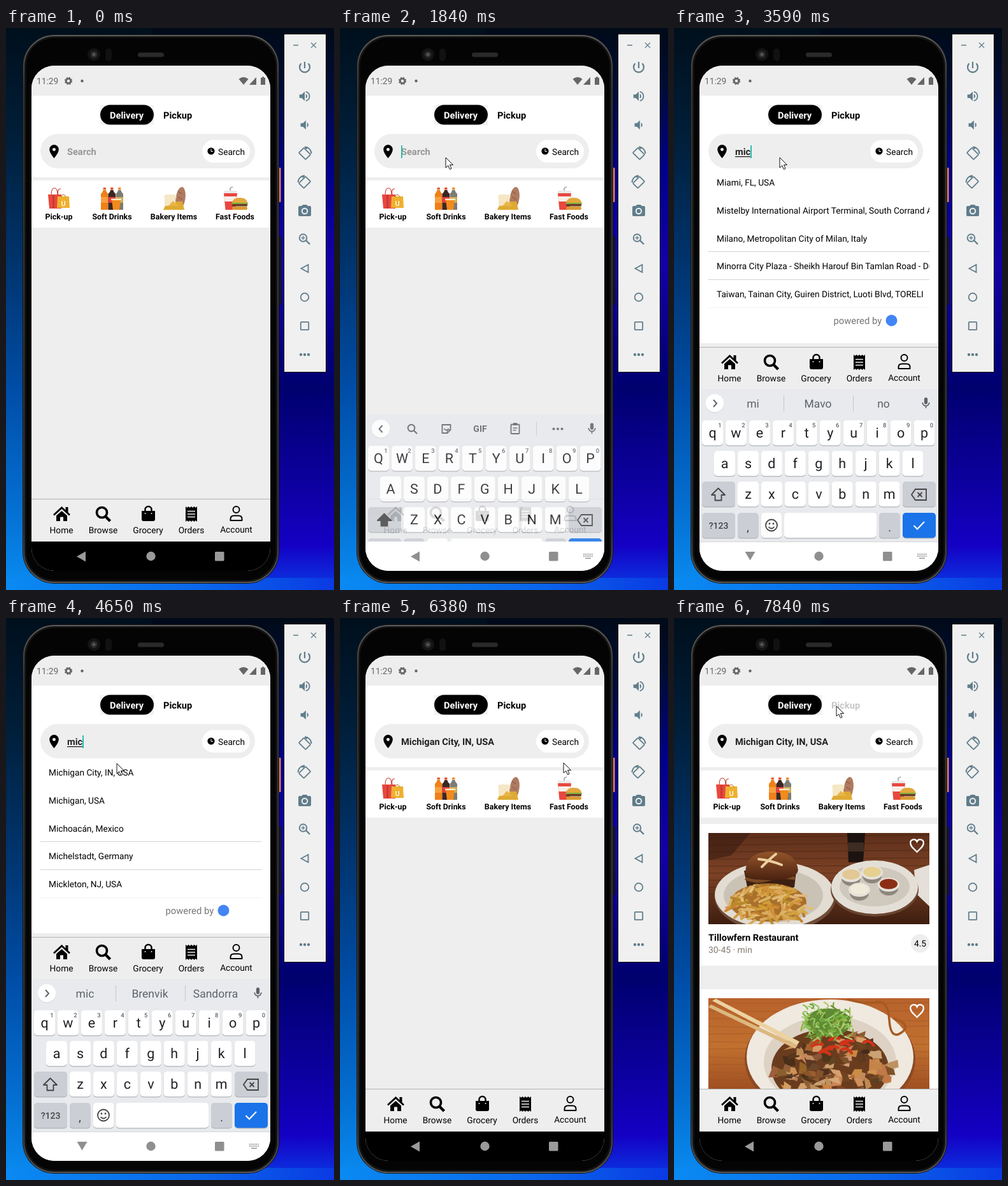
An HTML page for the animation above (8 s loop, 515x881 px).

```html
<!DOCTYPE html>
<html lang="en">
<head>
<meta charset="utf-8">
<title>Food delivery app</title>
<style>
html, body { margin: 0; width: 100%; height: 100%; overflow: hidden; background: #001020; }
svg { display: block; width: 100%; height: 100%; }
text { font-family: Roboto, "Open Sans", sans-serif; text-rendering: geometricPrecision; white-space: pre; }
</style>
</head>
<body>
<svg id="stage" viewBox="0 0 515 881" preserveAspectRatio="none"></svg>
<script>
const LOOP = 8000;

// ---- drawing helpers ----
const rect = (x, y, w, h, fill, r = 0, more = '') =>
  `<rect x="${x}" y="${y}" width="${w}" height="${h}" rx="${r}" fill="${fill}" ${more}/>`;
const disc = (x, y, r, fill, more = '') => `<circle cx="${x}" cy="${y}" r="${r}" fill="${fill}" ${more}/>`;
const oval = (x, y, rx, ry, fill, more = '') =>
  `<ellipse cx="${x}" cy="${y}" rx="${rx}" ry="${ry}" fill="${fill}" ${more}/>`;
const path = (d, fill, more = '') => `<path d="${d}" fill="${fill}" ${more}/>`;
const line = (d, color, w = 2, more = '') =>
  `<path d="${d}" fill="none" stroke="${color}" stroke-width="${w}" ${more}/>`;
const ring = (x, y, r, color, w = 2, more = '') =>
  `<circle cx="${x}" cy="${y}" r="${r}" fill="none" stroke="${color}" stroke-width="${w}" ${more}/>`;
const text = (x, y, size, str, { w = 400, f = '#000', a = 'start', id = '' } = {}) =>
  `<text ${id && `id="${id}"`} x="${x}" y="${y}" font-size="${size}" font-weight="${w}" fill="${f}" text-anchor="${a}">${str}</text>`;
const group = (id, body, more = '') => `<g ${id && `id="${id}"`} ${more}>${body}</g>`;
const at = (x, y, scale, body) => group('', body, `transform="translate(${x} ${y}) scale(${scale}) translate(-12 -12)"`);
const grad = (id, dir, stops) => `<linearGradient id="${id}" ${dir}>` +
  stops.map(([o, c]) => `<stop offset="${o}" stop-color="${c}"/>`).join('') + '</linearGradient>';
const DOWN = 'x1="0" y1="0" x2="0" y2="1"';
const ROUND = 'stroke-linecap="round"';
let seed = 7;
const rnd = (lo, hi) => lo + (hi - lo) * ((seed = (seed * 16807) % 2147483647) / 2147483647);
const many = (n, fn) => Array.from({ length: n }, (_, i) => fn(i)).join('');

const defs = '<defs>' +
  grad('left', DOWN, [[0, '#000f1c'], [.2, '#001f3a'], [.45, '#003775'], [.65, '#004ea8'], [.85, '#046ed0'], [1, '#0a8cf2']]) +
  grad('right', DOWN, [[0, '#000a18'], [.1, '#000c34'], [.25, '#00008c'], [.42, '#1400a8'], [.64, '#00006e'], [.8, '#0c009c'], [.92, '#1400c4'], [1, '#0a3ae4']]) +
  grad('floor', '', [[0, '#0a8af2'], [.6, '#0a66ea'], [1, '#0a3ae4']]) +
  grad('rim', DOWN, [[0, '#5c5c5c'], [.1, '#353535'], [.9, '#333'], [1, '#565656']]) +
  grad('wood', DOWN, [[0, '#5e2f1a'], [.45, '#7c4226'], [1, '#3d1d10']]) +
  grad('oak', DOWN, [[0, '#b8622c'], [.5, '#c0702f'], [1, '#9c4c20']]) +
  grad('bun', DOWN, [[0, '#94552a'], [1, '#4a2110']]) +
  `<clipPath id="screen">${rect(40, 59, 375, 792, '#000', 36)}</clipPath>` +
  `<clipPath id="rows">${rect(54, 220, 347, 270, '#000')}</clipPath>` +
  `<clipPath id="pic1">${rect(54, 337, 347, 143, '#000')}</clipPath>` +
  `<clipPath id="pic2">${rect(54, 596, 347, 150, '#000')}</clipPath>` +
  '</defs>';

// ---- desktop, phone body and emulator bar ----
const desktop = () => rect(0, 0, 230, 881, 'url(#left)') + rect(230, 0, 285, 881, 'url(#right)') +
  rect(0, 862, 515, 19, 'url(#floor)');

const phone = () =>
  rect(427, 219, 4.5, 54, '#f0805c', 1) + rect(427, 327, 5, 107, '#16161c', 1) +
  rect(26, 10, 403, 861, '#141414', 50) +
  rect(28, 12, 399, 857, 'none', 48, 'stroke="url(#rim)" stroke-width="2"') +
  rect(31.5, 15.5, 392, 850, '#040404', 45) +
  disc(138, 41.5, 10, '#131313') + disc(138, 41.5, 5.5, '#2a2a2a') + disc(138, 41.5, 2.5, '#555') +
  rect(156, 32, 10, 20, '#111', 5) + rect(207, 38.5, 41, 7, '#2a2a2a', 3.5);

function sideBar() {
  const c = '#607d8b', x = 469;
  const cone = 'M3 9v6h4l5 5V4L7 9Z';
  const turn = m => group('', rect(-5.5, -7.5, 11, 15, 'none', 1, `transform="rotate(-45)" stroke="${c}" stroke-width="1.8"`) +
    line('M0-10.500A10.500 10.500 0 0 1 10.500 0M0-10.500l3.500 3', c, 1.8),
    `transform="translate(${x} ${m < 0 ? 242 : 197}) scale(${m} 1)"`);
  return rect(436.5, 9.5, 66, 530, '#f0f0f0', 0, 'stroke="#000"') +
    line('M451 27h8M479 23l8 8m0-8l-8 8', '#607d8b', 1.3) +
    line('M469 53v10M463.5 55.5A8 8 0 1 0 474.5 55.5', c, 2.2) +
    at(x, 107, .92, path(cone, c) + path('M14 8a4.5 4.5 0 0 1 0 8Z', c) + line('M14 4.2a8 8 0 0 1 0 15.6', c, 2)) +
    at(x, 152, .92, path(cone, c, 'transform="translate(2)"') + path('M16 8a4.5 4.5 0 0 1 0 8Z', c)) +
    turn(1) + turn(-1) +
    at(x, 287, 1, path('M9 2L7.2 4H4a2 2 0 0 0-2 2V18a2 2 0 0 0 2 2H20a2 2 0 0 0 2-2V6a2 2 0 0 0-2-2H16.8L15 2Z', c) +
      ring(12, 12, 4.2, '#f0f0f0', 2)) +
    ring(466.5, 329, 5.8, c, 1.9) + line('M471 333l6 6', c, 2.4) + line('M463.5 329h6m-3-3v6', c, 1.3) +
    line('M474.5 371V383L463.5 377Z', c, 1.8) + ring(x, 422, 6.3, c, 1.8) +
    rect(462.8, 460.8, 12.4, 12.4, 'none', 1, `stroke="${c}" stroke-width="1.8"`) +
    [-6, 0, 6].map(d => disc(x + d, 512, 2.2, c)).join('');
}

// ---- app ----
const statusBar = () => {
  const c = '#666';
  return rect(40, 59, 375, 47, '#eee') + text(48, 88, 13.8, '11:29', { f: c }) +
    ring(98, 83, 3.6, c, 2.6) + ring(98, 83, 5.2, c, 1.8, 'stroke-dasharray="2.4 1.7"') + disc(119.5, 83, 2.2, c) +
    path('M365.5 80Q373 74 380.5 80L373 89Z', c) + path('M382 89H393V77Z', c) +
    path('M402 76.500h3V78h2V89h-7V78h2Z', c);
};

const bags = () => line('M71 262q0-11 5-11t5 11M82 262q-2-10 4-10', '#c64a40', 1.2) +
  path('M66 261H87V283H68Z', '#e9473e') + rect(73, 262, 3, 21, '#c93a33') +
  path('M81 264H99L100 282H80Z', '#efb02e') + line('M86 265q4-8 8 0', '#a9741a', 1) +
  text(90, 279, 11, 'U', { w: 500, f: '#fff', a: 'middle' });

const bottle = (x, body, label, cap) => rect(x + 3.5, 250, 4.5, 3.5, cap, 1) +
  path(`M${x + 3.5} 254h4.500q0 3 3.500 6V285h-11.500V260q3.500-3 3.500-6Z`, body) + rect(x, 265, 11.5, 9, label);
const drinks = () => bottle(149, '#f08018', '#f8a040', '#e8602c') + bottle(160.5, '#3b2724', '#e6403a', '#e8502c') +
  bottle(172.5, '#7c7c74', '#c9b25a', '#f08a2c') +
  path('M166 269h14l-2 16h-10Z', '#f28a1c') + rect(165, 267.5, 16, 2.5, '#ffe9c8');

const bread = () => oval(274, 267, 7.5, 18, '#b07a60', 'transform="rotate(8 274 267)"') +
  line('M270 256l6 4m-6 5l7 4m-7 5l6 4', '#8f5c46', 1.3) +
  path('M247 285L253 272H277L280 285Z', '#deaa32') +
  path('M249 279V267Q246 261 254 261H264Q270 264 266 268V278Z', '#f6e7c4') +
  path('M255 279L262 271 271 279Z', '#e8b648');

const burger = () => line('M352 258V251L356 249', '#888', 1.2) + rect(342, 255, 21, 4, '#e9e9e9', 2) +
  path('M342 259H363L360.500 285H344.500Z', '#e8483f') + path('M342.500 264H362.500L361.500 272H343.500Z', '#f7f0ea') +
  path('M355 274Q356 266 367 266T379 274Z', '#e2a83c') + rect(354, 274, 26, 2.5, '#7fae3c', 1) +
  rect(355, 276, 24, 3.5, '#6b3a26', 1) + rect(355, 280, 24, 5, '#d99a30', 2.5);

function header() {
  return rect(40, 106, 375, 128, '#fff') + rect(148, 121, 84, 31, '#f2f2f2') + rect(148, 120.5, 84, 31, '#000', 15.5) +
    text(163, 141.6, 14.6, 'Delivery', { w: 700, f: '#fff' }) +
    text(247, 141.6, 14.6, 'Pickup', { w: 700, id: 'pickup' }) +
    rect(54, 166, 337, 54, '#eee', 27) + rect(308, 175.5, 75, 35.5, '#fff', 17.7) +
    at(75.500, 193.500, 1.04, path('M12 2A7 7 0 0 0 5 9c0 5.250 7 13 7 13s7-7.750 7-13A7 7 0 0 0 12 2Z', '#000') + disc(12, 9, 2.4, '#eee')) +
    disc(322, 193, 5.6, '#000') + line('M322 189.500V193.500H325', '#fff', 1) +
    text(333, 198.6, 13.7, 'Search') +
    text(96, 199.2, 14.6, 'Search', { w: 700, f: '#979797', id: 'hint' }) +
    text(96, 199.2, 14.6, '', { w: 700, f: '#222', id: 'value' }) +
    rect(96, 201, 0, 1.3, '#222', 0, 'id="under"') + rect(96, 184, 1.8, 20, '#17b8a6', 0, 'id="caret"');
}

const categories = () => rect(40, 239, 375, 74, '#fff') + bags() + drinks() + bread() + burger() +
  [[83, 'Pick-up'], [166.5, 'Soft Drinks'], [263.5, 'Bakery Items'], [359.5, 'Fast Foods']]
    .map(([x, s]) => text(x, 300, 12.4, s, { w: 700, a: 'middle' })).join('');

// ---- flat food pictures ----
const fries = () => oval(148, 446, 60, 30, '#a8702c') + many(120, () => {
  const r = Math.sqrt(rnd(0, 1)), b = rnd(0, 6.28), x = 148 + 60 * r * Math.cos(b), y = 446 + 30 * r * Math.sin(b);
  const a = rnd(0, Math.PI), n = rnd(8, 20);
  return line(`M${x} ${y}l${Math.cos(a) * n} ${Math.sin(a) * n * .7}`, `hsl(${rnd(33, 42)} 62% ${rnd(44, 70)}%)`, 4, ROUND);
});

const dip = (x, y, c) => oval(x, y + 5, 15, 12, '#8e877e') + oval(x, y, 17, 11, '#e6e2da') + oval(x, y - 1, 14, 8, c);

const photo1 = () => group('', rect(54, 337, 347, 143, 'url(#wood)') +
  many(9, i => line(`M54 ${345 + i * 11}L401 ${340 + i * 12}`, '#3a1a0e', 1, 'opacity=".5"')) +
  path('M54 337H120L90 372 54 380Z', '#3a1c12', 'opacity=".6"') +
  path('M272 337H300L297 383H274Z', '#1c1210') + rect(273, 352, 25, 14, '#3d2c22') +
  path('M377 395L401 387V452L380 432Z', '#e4dfd8') +
  oval(159, 438, 95, 54, '#6e4c38') + oval(158, 434, 94, 52, '#e2dcd2') + oval(156, 435, 78, 42, '#cbc2b6') +
  path('M110 396h82l-3 26q-36 12-74 0Z', '#3c2012') + line('M112 408q18 8 36 2t42-2', '#7a4a22', 5) + fries() +
  path('M112 400Q112 367 152 366T195 396Q190 411 152 411T112 400Z', 'url(#bun)') +
  line('M133 378Q152 380 169 387M160 370Q150 378 138 390', '#ecd0a0', 4, ROUND) +
  oval(315, 426, 69, 42, '#6a4632') + oval(315, 422, 68, 42, '#e4dfd6') + oval(315, 421, 55, 31, '#cfc8bd') +
  dip(278, 403, '#e2c894') + dip(311, 399, '#e6d090') + dip(291, 426, '#f0ead8') + dip(337, 418, '#8c2e14'),
  'clip-path="url(#pic1)"');

const photo2 = () => group('', rect(54, 596, 347, 150, 'url(#oak)') +
  many(12, i => line(`M54 ${604 + i * 12}q170 ${rnd(-9, 9)} 347 ${rnd(-5, 5)}`, '#9a4e20', 1.2, 'opacity=".45"')) +
  oval(245, 692, 134, 92, '#8c4a24') + oval(245, 688, 131, 90, '#efe9e0') + oval(245, 696, 104, 72, '#ddd2c4') +
  line('M274 598Q300 606 318 602T338 630 357 650 346 628', '#a85a20', 3.5, ROUND) +
  oval(245, 706, 92, 62, '#6a3c1e') +
  many(130, () => {
    const a = rnd(0, 6.28), r = Math.sqrt(rnd(0, 1)), x = 245 + 90 * r * Math.cos(a), y = 706 + 58 * r * Math.sin(a);
    return path(`M${x} ${y}l${rnd(8, 20)} ${rnd(-8, 8)}l${rnd(-5, 5)} ${rnd(6, 13)}l${rnd(-20, -8)} ${rnd(-5, 5)}Z`,
      `hsl(${rnd(22, 33)} ${rnd(42, 58)}% ${rnd(18, 66)}%)`);
  }) +
  many(11, () => line(`M${rnd(215, 300)} ${rnd(652, 686)}q8-5 ${rnd(10, 20)} ${rnd(-6, 8)}`, '#cf3418', 4.5, ROUND)) +
  oval(242, 634, 36, 22, '#5f8a34') +
  many(110, () => {
    const x = rnd(205, 278), y = rnd(612, 658);
    return line(`M${x} ${y}q${rnd(-10, 10)} -4 ${rnd(-13, 13)} ${rnd(-12, 12)}`, `hsl(${rnd(76, 95)} 46% ${rnd(30, 66)}%)`, 2.2, ROUND);
  }) +
  path('M60 600L66 597 197 664 193 670Z', '#ecd2a0') + path('M54 610L58 606 194 670 190 675Z', '#dcb880'),
  'clip-path="url(#pic2)"');

const heart = y => at(381.5, y, 1.14, line('M12 20.500L10.500 19C5.500 14.500 3 12 3 8.500A4.700 4.700 0 0 1 12 6.300 4.700 4.700 0 0 1 21 8.500C21 12 18.500 14.500 13.500 19Z', '#fff', 2));

const cards = () => rect(40, 323, 375, 222, '#fff') + rect(40, 582, 375, 160, '#fff') +
  photo1() + photo2() + heart(357) + heart(616) +
  text(54, 505.5, 14.6, 'Tillowfern Restaurant', { w: 700 }) +
  text(54, 525, 13.9, '30-45 · min', { f: '#85796f' }) +
  disc(386.5, 510, 14.5, '#eee') + text(386.5, 515, 13.7, '4.5', { a: 'middle' });

// ---- place list ----
const PLACES = {
  mi: ['Miami, FL, USA', 'Mistelby International Airport Terminal, South Corrand Ave', 'Milano, Metropolitan City of Milan, Italy',
    'Minorra City Plaza - Sheikh Harouf Bin Tamlan Road - Dubai', 'Taiwan, Tainan City, Guiren District, Luoti Blvd, TORELI'],
  mic: ['Michigan City, IN, USA', 'Michigan, USA', 'Michoacán, Mexico', 'Michelstadt, Germany', 'Mickleton, NJ, USA']
};
const rows = key => group('rows-' + key, PLACES[key].map((s, i) =>
  text(67, 246.800 + i * 43.85, 13.7, s, { id: key + i })).join(''), 'clip-path="url(#rows)"');
const list = () => rect(40, 220, 375, 274, '#fff') + rect(40, 494, 375, 6, '#eee') +
  rect(54, 350, 347, 1, '#d2d2d2') + rect(54, 394, 347, 1, '#d2d2d2') + rect(54, 438, 347, 1, '#f3f3f3') +
  rows('mi') + rows('mic') +
  group('credit', text(250.5, 463.5, 14.8, 'powered by', { f: '#757575' }) + disc(341.5, 458.5, 9, '#4285f4'));

// ---- tab bar ----
const tabs = () => rect(40, 738, 375, 67, '#eee') + rect(40, 738, 375, 1, '#b4b4b4') +
  line('M75 763.500L87.500 752 100 763.500', '#000', 2.8) + rect(93.500, 751, 4, 8, '#000') +
  path('M79 764.500L87.500 757 96 764.500V773H90V766.500H85V773H79Z', '#000') +
  ring(150.5, 759.5, 8, '#000', 3.6) + line('M156 765.500l7.500 7.500', '#000', 4.4) +
  path('M213 757H234V770q0 3-3 3H216q-3 0-3-3Z', '#000') + line('M218.500 758V755a5 5 0 0 1 10 0V758', '#000', 2.4) +
  disc(218.5, 761, 1, '#eee') + disc(228.5, 761, 1, '#eee') +
  path('M282 750l2.250 2 2.250-2 2.250 2 2.250-2 2.250 2 2.250-2 2.250 2 2.250-2V774l-2.250-2-2.250 2-2.250-2-2.250 2-2.250-2-2.250 2-2.250-2-2.250 2Z', '#000') +
  line('M285 757.500h12m-12 4.500h12m-12 4.500h12', '#eee', 1.6) +
  ring(361.5, 755, 5, '#000', 2) + path('M352.500 772V769.500Q352.500 764.500 358 764.500H365Q370.500 764.500 370.500 769.500V772Z', 'none', 'stroke="#000" stroke-width="2" stroke-linejoin="round"') +
  [[87, 'Home', 792], [152.5, 'Browse', 792], [223, 'Grocery', 792], [291, 'Orders', 792], [361.5, 'Account', 791]]
    .map(([x, s, y]) => text(x, y, 13.7, s, { a: 'middle' })).join('');

// ---- keyboard ----
const INK = '#5f6368';
const key = (x, y, w, fill = '#fff') => rect(x, y + 1, w, 39.5, '#aeb1b6', 5) + rect(x, y, w, 39.3, fill, 5);
const letters = (s, x0, y) => [...s].map((c, i) => {
  const x = x0 + i * 36.95;
  return key(x, y, 33) + `<text class="cap" x="${x + 16.5}" y="${y + 27}" font-size="21.5" fill="#202124" text-anchor="middle">${c}</text>`;
}).join('');
const arrow = id => line(id == 'more' ? 'M62 583l5 5.500-5 5.500' : 'M66.500 583l-5 5.500 5 5.500', INK, 2, `id="${id}"`);

function keyboard() {
  const dull = '#cbced4';
  const words = ['w0', 'w1', 'w2'].map((id, i) => text([124, 226, 329][i], 595, 17.5, '', { f: INK, a: 'middle', id })).join('');
  const tools = group('tools', rect(87, 567, 53, 42, '#d8dadd', 0, 'id="tile"') +
    ring(112, 587, 5.3, INK, 2) + line('M116 591l5 5', INK, 2.2) +
    path('M160.500 582h13v8l-5 5h-8Z', 'none', `stroke="${INK}" stroke-width="1.8"`) + line('M163.500 588q3.500 5 7 0M168.500 595v-5h5', INK, 1.4) +
    text(220, 593, 14, 'GIF', { w: 700, f: INK, a: 'middle' }) +
    rect(268.5, 581.5, 13, 14.5, 'none', 1, `stroke="${INK}" stroke-width="1.8"`) + rect(272, 579, 6, 4, INK) +
    line('M271.500 587h7m-7 3.500h5', INK, 1.4) + rect(308, 577, 1, 22, '#c9ccd0') +
    [335.5, 342, 348.5].map(x => disc(x, 588.5, 2, INK)).join('') + arrow('less'));
  return rect(40, 566, 375, 239, '#e8eaed') + disc(64, 589, 14.3, '#c6c9cd') + disc(64, 588.2, 14.3, '#fff') + tools +
    group('words', rect(172, 576, 1, 25, '#c3c6ca') + rect(281, 576, 1, 25, '#c3c6ca') + words + arrow('more')) +
    at(395.5, 588, .88, rect(9, 2, 6, 12, INK, 3) + line('M6 11a6 6 0 0 0 12 0M12 17v4', INK, 2)) +
    letters('qwertyuiop', 44, 615) + letters('asdfghjkl', 63, 663) + letters('zxcvbnm', 100, 711) +
    [...'1234567890'].map((c, i) => text(72 + i * 36.95, 626, 9.5, c, { f: INK, w: 500, a: 'middle' })).join('') +
    key(44, 711, 52, dull) + path('M69.500 721.500L59 732H64.500V740.500H74.500V732H80Z', 'none', `id="shift" stroke="#444" stroke-width="1.8" stroke-linejoin="round"`) +
    key(359, 711, 52, dull) + line('M379 723H396V740H379L373 731.500ZM382.500 728l7 7m0-7l-7 7', '#444', 1.8) +
    key(44, 760, 52, dull) + text(70, 785, 14, '?123', { f: '#444', w: 500, a: 'middle' }) +
    key(100, 760, 32.5, dull) + text(116, 789, 18, ',', { f: '#333', a: 'middle' }) +
    key(137, 760, 32.5) + ring(153, 779.5, 9, '#444', 1.8) + disc(150, 777, 1.4, '#444') + disc(156, 777, 1.4, '#444') + line('M148.500 782q4.500 5 9 0', '#444', 1.8) +
    key(173, 760, 145) + key(322, 760, 33, dull) + text(338.5, 789, 18, '.', { f: '#333', a: 'middle' }) +
    key(359, 760, 52, '#1a73e8') + line('M376.500 780l5.500 5.500 11-11.500', '#fff', 2.2);
}

const navBar = () => rect(40, 805, 375, 46, '#000', 0, 'id="navBg"') + rect(40, 805, 375, 1, '#d6d6d6', 0, 'id="navLine"') +
  group('navIcons', path('M111 828.500L125 820.500V836.500Z', 'inherit', 'id="back"') + path('M111.500 821H127.500L119.500 834.500Z', 'inherit', 'id="down"') +
    disc(227.5, 828, 7.2, 'inherit') + rect(328, 821, 14.5, 14.5, 'inherit', 1.5)) +
  group('keysIcon', many(12, i => rect(382 + (i % 6) * 2.6, 824 + Math.floor(i / 6) * 3, 1.6, 1.8, '#999')) + rect(385, 830.5, 9, 1.6, '#999'));

const pointer = group('mouse', path('M0 0V16L3.800 12.600 6.400 18.600 9 17.500 6.500 11.600H11.500Z', '#fff', 'stroke="#111" stroke-linejoin="round"'));

const stage = document.getElementById('stage');
stage.innerHTML = defs + desktop() + phone() +
  group('', rect(40, 59, 375, 792, '#eee') + statusBar() + header() + categories() + group('cards', cards()) + group('list', list()) +
    rect(40, 566, 375, 239, '#fff', 0, 'id="gap"') + group('tabs', tabs()) + group('keyboard', keyboard()) + navBar(), 'clip-path="url(#screen)"') +
  sideBar() + pointer;

// ---- timeline: [start ms, value] ----
const TRACKS = {
  mouse: [[0, null], [640, [445, 467]], [770, [298, 352]], [900, [155, 244]], [1040, [139, 218]], [1170, [166, 203]],
    [4520, [168, 214]], [4650, [174, 228]], [4780, [177, 236]], [4920, [186, 233]], [5310, [211, 239]], [5450, [236, 242]], [5580, [254, 246]],
    [5720, [276, 230]], [5850, [299, 240]], [5980, [317, 252]], [6120, [329, 247]], [6380, [351, 227]],
    [6650, [346, 268]], [6780, [328, 312]], [6910, [306, 325]], [7040, [291, 283]], [7180, [264, 214]], [7310, [248, 151]], [7450, [255, 138]]],
  value: [[0, ''], [2500, 'm'], [2630, 'mi'], [3320, 'mic'], [5310, 'Michigan City, IN, USA']],
  caret: [[0, 0], [1450, 1], [1970, 0], [2500, 1], [3990, 0], [4380, 1], [4920, 0]],
  words: [[0, null], [2900, ['', '', '']], [3050, ['mi', 'Mavo', 'no']], [3850, ['mic', 'Brenvik', 'Sandorra']]],
  places: [[0, ''], [2900, 'mi'], [3720, 'mic'], [5310, '']],
  credit: [[0, 0], [3050, 1]],
  press: [[0, 1], [4920, .75], [5050, .5]],
  caps: [[0, 1], [2500, 0]],
  keys: [[0, null], [1840, [40, .85]], [1970, [0, 1]], [5310, [4, .87]], [5450, [60, .35]], [5580, null]],
  small: [[0, 0], [1970, 1], [5450, 0]],
  nav: [[0, ['#000', '#9a9a9a']], [1840, ['#fff', '#8f8f8f']], [5310, ['#dcdcdc', '#c3c3c3']], [5450, ['#000', '#9a9a9a']]],
  down: [[0, 0], [2110, 1], [5450, 0]],
  keysIcon: [[0, 0], [1450, 1], [5310, 0]],
  cards: [[0, 0], [6510, 1]],
  pickup: [[0, 1], [7710, .6], [7840, .22]]
};
const now = (track, t) => TRACKS[track].reduce((v, [start, next]) => t >= start ? next : v, null);

const el = id => document.getElementById(id);
const set = (id, name, v) => el(id).setAttribute(name, v);
const show = (id, on) => set(id, 'display', on ? 'inline' : 'none');
const caps = [...document.querySelectorAll('.cap')];

function draw(t) {
  const s = {};
  for (const k in TRACKS) s[k] = now(k, t);

  show('mouse', s.mouse);
  if (s.mouse) set('mouse', 'transform', `translate(${s.mouse})`);

  el('value').textContent = s.value;
  show('hint', !s.value);
  const width = s.value ? el('value').getComputedTextLength() : 0;
  set('under', 'width', s.value.length < 4 ? width : 0);
  set('caret', 'x', 96 + width);
  show('caret', s.caret);

  show('list', s.places);
  show('rows-mi', s.places === 'mi');
  show('rows-mic', s.places === 'mic');
  show('credit', s.credit);
  set('mic0', 'opacity', s.press);

  show('keyboard', s.keys);
  if (s.keys) {
    set('keyboard', 'transform', `translate(0 ${s.keys[0]})`);
    set('keyboard', 'opacity', s.keys[1]);
  }
  show('tools', !s.words);
  show('tile', !s.caps);
  show('words', s.words);
  (s.words || []).forEach((w, i) => el('w' + i).textContent = w);
  caps.forEach(c => c.textContent = s.caps ? c.textContent.toUpperCase() : c.textContent.toLowerCase());
  set('shift', 'fill', s.caps ? '#444' : 'none');

  show('gap', s.small);
  set('tabs', 'transform', `translate(0 ${s.small ? -238 : 0})`);
  set('navBg', 'fill', s.nav[0]);
  set('navIcons', 'fill', s.nav[1]);
  show('navLine', s.small);
  show('back', !s.down);
  show('down', s.down);
  show('keysIcon', s.keysIcon);

  show('cards', s.cards);
  set('pickup', 'opacity', s.pickup);
}

const start = performance.now();
function tick() {
  draw((performance.now() - start) % LOOP);
  requestAnimationFrame(tick);
}
tick();
</script>
</body>
</html>
```
